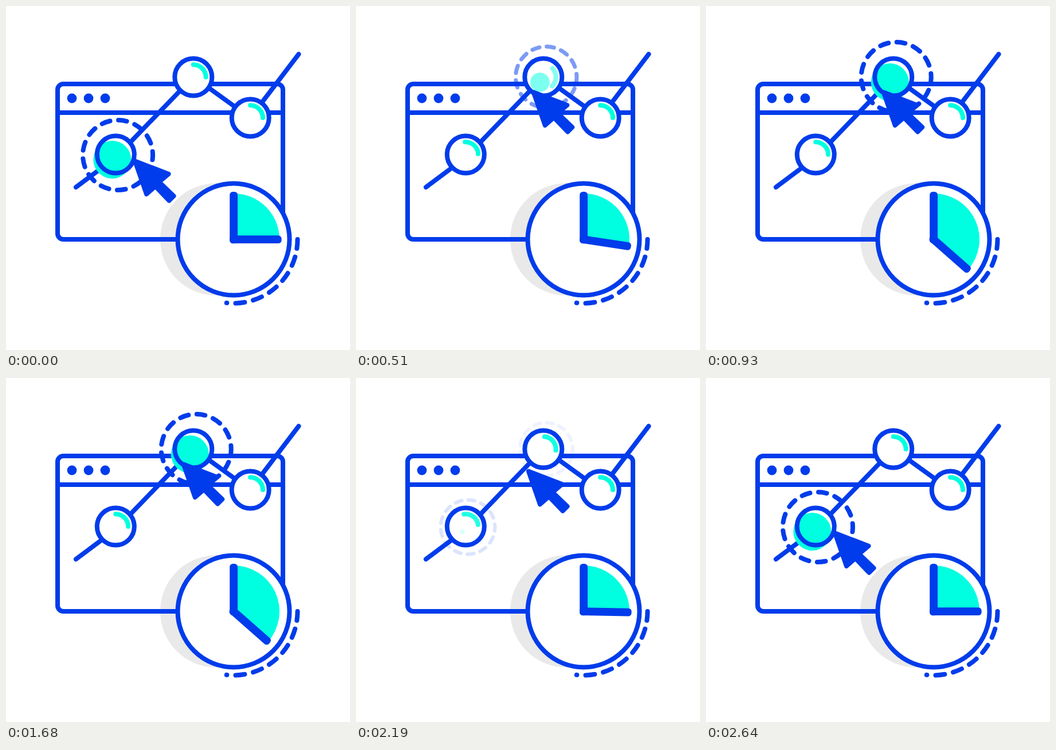
Recreate the animation shown at these times as an HTML page. Size 600 by 600 pixels, loop 2670 ms.

```html
<!DOCTYPE html>
<html lang="en">
<head>
<meta charset="utf-8">
<title>Chart animation</title>
<style>
  html, body { margin: 0; width: 100%; height: 100%; overflow: hidden; background: #fff; }
  svg { display: block; width: 100vw; height: 100vh; }
  .line { fill: none; stroke: #003ceb; stroke-width: 8; stroke-linecap: round; stroke-linejoin: round; }
  .node { stroke: #003ceb; stroke-width: 8; }
  .blue { fill: #003ceb; }
  .teal { fill: #00ffe0; }
  .shine { fill: none; stroke: #00ffe0; stroke-width: 8; stroke-linecap: round; }
</style>
</head>
<body>
<svg viewBox="0 0 600 600">
  <circle cx="367" cy="407" r="98" fill="#e9e9e9"/>

  <!-- browser window -->
  <rect class="line" x="90" y="136" width="393" height="271" rx="10"/>
  <path class="line" d="M90 186H483"/>
  <g class="blue">
    <circle cx="115" cy="161" r="8.4"/>
    <circle cx="144" cy="161" r="8.4"/>
    <circle cx="173" cy="161" r="8.4"/>
  </g>

  <!-- line chart -->
  <path class="line" d="M122 316L191 264.5L327 123.5L426 195L510.500 84"/>
  <g id="nodes"></g>

  <!-- pie -->
  <circle class="node" cx="397" cy="407" r="97.5" fill="#fff"/>
  <path id="slice" class="teal"/>
  <rect class="blue" x="390.2" y="324" width="13.800" height="90.200" rx="5.500"/>
  <rect id="hand" class="blue" x="390.2" y="400.300" width="90.400" height="13.800" rx="5.500"/>
  <path id="orbit" class="line" pathLength="96.3" stroke-dasharray="8.2 7.8"/>

  <path id="cursor" class="line" style="fill:#003ceb"
    d="M225 270.500L283.500 293L267 307L292.500 331.500L284.500 339.500L260.500 314.500L245 328Z"/>
</svg>
<script>
const LOOP = 2670, STEP = 30, MIRROR = 87;
const $ = id => document.getElementById(id);
const clamp = x => Math.min(1, Math.max(0, x));
const span = (n, start, length) => clamp((n - start) / length);
const smooth = s => s * s * (3 - 2 * s);

// cubic-bezier(.2, 0, .2, 1)
function swift(x) {
  let lo = 0, hi = 1;
  for (let i = 0; i < 24; i++) {
    const t = (lo + hi) / 2;
    if (0.6 * t * (1 - t) + t ** 3 < x) lo = t; else hi = t;
  }
  return smooth((lo + hi) / 2);
}

function polar(cx, cy, r, deg) {
  const a = deg * Math.PI / 180;
  return `${cx + r * Math.cos(a)} ${cy + r * Math.sin(a)}`;
}

function add(parent, tag, attrs) {
  const el = document.createElementNS("http://www.w3.org/2000/svg", tag);
  for (const key in attrs) el.setAttribute(key, attrs[key]);
  parent.appendChild(el);
  return el;
}

// Ring and disc are optional: the third node never becomes active.
function makeNode(x, y, ringX, ringY) {
  const g = add($("nodes"), "g", {});
  const active = ringX !== undefined;
  const ring = active && add(g, "circle", {
    class: "line", r: 61, pathLength: 13, "stroke-dasharray": "0.5 0.5"
  });
  add(g, "circle", { cx: x, cy: y, r: 32.5, fill: "#fff" });
  const disc = active && add(g, "circle", { class: "teal", cx: x - 6, cy: y + 9 });
  const shine = add(g, "path", {
    class: "shine", d: `M${x} ${y - 21.8}A21.8 21.8 0 0 1 ${x + 21.8} ${y}`
  });
  add(g, "circle", { class: "node", cx: x, cy: y, r: 32.5, fill: "none" });

  return (p, turn) => {
    ring.setAttribute("transform",
      `translate(${ringX} ${ringY}) scale(${0.74 + 0.26 * p}) rotate(-89)`);
    ring.setAttribute("opacity", p);
    disc.setAttribute("r", 33 * p);
    disc.setAttribute("opacity", p);
    shine.setAttribute("transform", `rotate(${turn} ${x} ${y})`);
    shine.setAttribute("opacity", 1 - p);
  };
}

const first = makeNode(191.3, 259, 195, 260);
const second = makeNode(326.8, 124, 331.7, 124);
makeNode(426.2, 195);

$("orbit").setAttribute("d",
  `M${polar(397, 407, 111.5, 0)}A111.5 111.5 0 0 1 ${polar(397, 407, 111.5, 96.3)}`);

function draw(time) {
  const frame = Math.floor((time % LOOP) / STEP);
  const n = frame < 50 ? frame : MIRROR - frame;

  const p1 = 1 - smooth(span(n, 3.4, 13.8));
  const p2 = swift(span(n, 12.8, 15));
  first(p1, -90 * (1 - span(n, 1.9, 22)) ** 3);
  second(p2, 90 * p2);

  const move = smooth(span(n, 2.3, 14.6));
  $("cursor").setAttribute("transform", `translate(${84.7 * move} ${-120 * move})`);

  const angle = 41.3 * smooth(span(n, 12.6, 15));
  $("hand").setAttribute("transform", `rotate(${angle} 397 407)`);
  $("slice").setAttribute("d",
    `M397 407L397 327A80 80 0 0 1 ${polar(397, 407, 80, angle)}Z`);
}

const begin = performance.now();
function tick() {
  draw(performance.now() - begin);
  requestAnimationFrame(tick);
}
tick();
</script>
</body>
</html>
```
